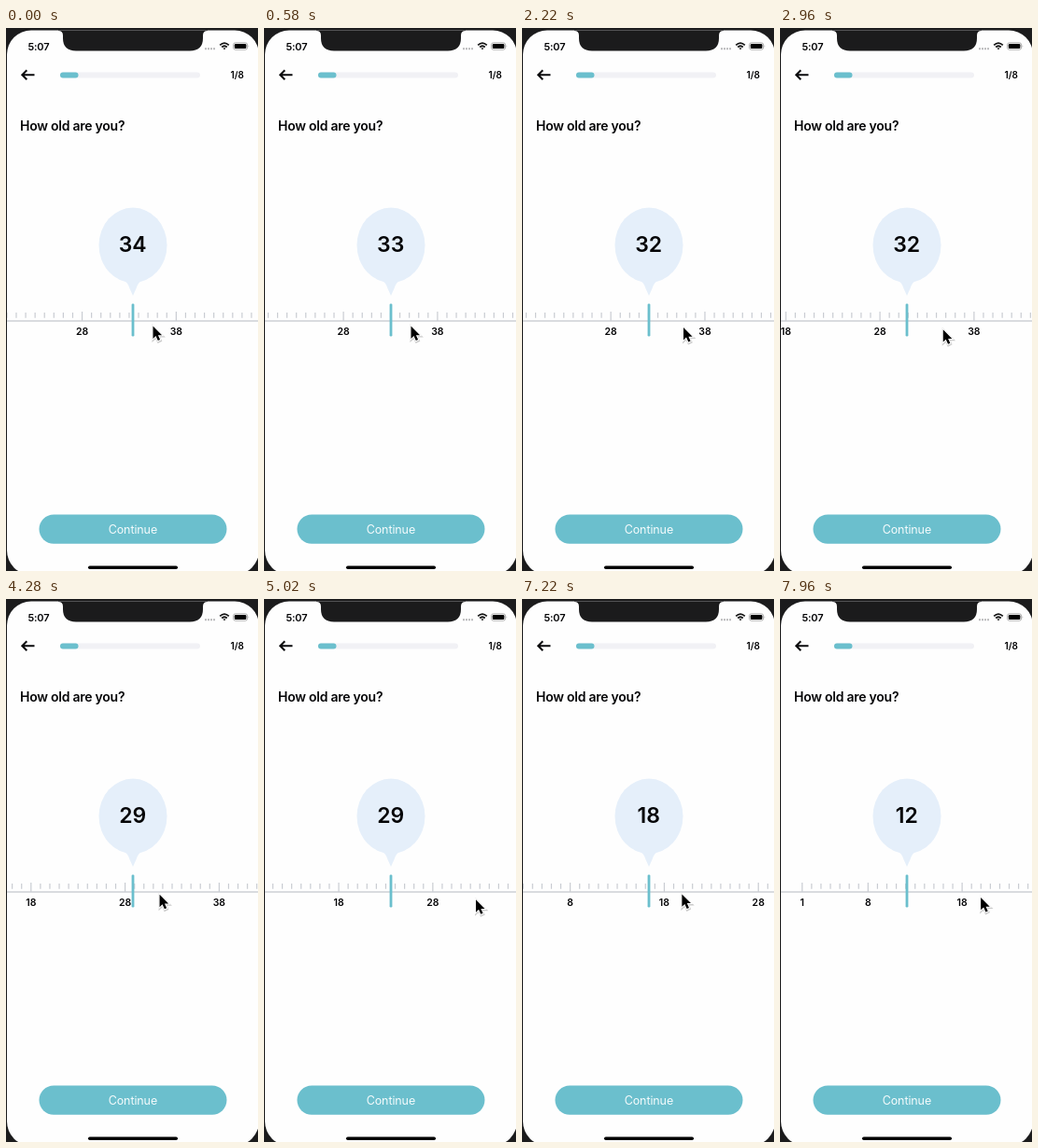
Animation of 270x582 px, one loop 8 s. Source, as an HTML page:

```html
<!DOCTYPE html>
<html lang="en">
<head>
<meta charset="utf-8">
<title>Age picker</title>
<style>
  html, body { margin: 0; width: 100%; height: 100%; overflow: hidden; background: #1b1b1c; }
  svg { display: block; width: 100vw; height: 100vh; }
  text { font-family: Inter, sans-serif; font-weight: 600; fill: #050507; }
  .mid { text-anchor: middle; }
  .teal { fill: #6bbfcd; }
</style>
</head>
<body>
<svg viewBox="0 0 270 582">
  <defs><clipPath id="screen"><rect x="1" y="2.5" width="270" height="583.5" rx="26"/></clipPath></defs>
  <g clip-path="url(#screen)">
    <rect width="272" height="590" fill="#fefefe"/>
    <path d="M56 0V3Q61 3 61 8V11Q61 24.4 75 24.4H197Q211 24.4 211 11V8Q211 3 216 3V0Z" fill="#1b1b1c"/>

    <!-- status bar -->
    <text x="23.5" y="23.5" font-size="11" letter-spacing="-.2">5:07</text>
    <path d="M213 22.3h11" stroke="#b9b9bb" stroke-width="2" stroke-dasharray="2 1"/>
    <g fill="none" stroke="#111" stroke-width="1.7">
      <path d="M229.2 18.4Q234 13.8 238.8 18.4M231.2 20.5Q234 18 236.8 20.5"/>
      <path d="M234 23.3l-1.5-1.6q1.5-1.1 3 0z" fill="#111" stroke="none"/>
    </g>
    <rect x="243.6" y="15.8" width="15" height="7.4" rx="2.2" fill="none" stroke="#999" stroke-width=".8"/>
    <rect x="244.8" y="17" width="12.6" height="5" rx="1.2"/>
    <path d="M259.6 18.2q1.4 1.3 0 2.6z" fill="#999"/>

    <!-- header -->
    <path d="M30.5 50.3H17.5M22.3 45.3L17.3 50.3L22.3 55.3" fill="none" stroke="#0a0a0c" stroke-width="2"/>
    <rect x="58" y="47.6" width="150" height="5.8" rx="2.9" fill="#f1f1f5"/>
    <rect x="58" y="47.6" width="19.5" height="5.8" rx="2.9" class="teal"/>
    <text x="240.5" y="54" font-size="10">1/8</text>
    <text x="15" y="110" font-size="14" letter-spacing="-.25">How old are you?</text>

    <!-- bubble -->
    <g fill="#e5effa">
      <ellipse cx="136" cy="232.8" rx="36.5" ry="40.2"/>
      <path d="M126 270Q130.5 273 132 278L136 287L140 278Q141.5 273 146 270Z"/>
    </g>
    <text id="age" class="mid" x="135.7" y="239.8" font-size="23"></text>

    <!-- ruler -->
    <path d="M0 314H271" stroke="#cccfd4" stroke-width="1.5"/>
    <g id="ruler"></g>
    <rect x="134.6" y="295.5" width="2.8" height="35" rx="1.2" class="teal"/>

    <rect x="35.5" y="521.4" width="201" height="31.4" rx="15.7" class="teal"/>
    <text class="mid" x="135.9" y="541.8" font-size="12.5" letter-spacing="-.1" style="font-weight:400;fill:#f5fbfc">Continue</text>
    <rect x="88" y="576.5" width="96" height="3.5" rx="1.75"/>

    <g id="cursor">
      <path id="arrow" d="M0 0V13.4L3 10.6L5.3 15.6L7.6 14.5L5.4 9.7H9.6Z" transform="translate(.4 1)" stroke="#000" stroke-width="2.8" opacity=".2"/>
      <use href="#arrow" transform="translate(-.4 -1)" opacity="0"/>
      <path d="M0 0V13.4L3 10.6L5.3 15.6L7.6 14.5L5.4 9.7H9.6Z" stroke="#fff" stroke-width="2" paint-order="stroke"/>
    </g>
  </g>
</svg>
<script>
const LOOP = 8000, STEP = 147.5, CENTER = 135.5, UNIT = 10.08;
const $ = id => document.getElementById(id);
const mix = (a, b, k) => a + (b - a) * k;
const clamp = k => Math.min(1, Math.max(0, k));
const ease = k => k * k * (3 - 2 * k);

// Each drag eases the ruler to an age while the pointer goes from one point to another;
// `back` is how many steps the pointer takes to reach the next drag's first point.
const drags = [
  { start: -6, end: 4,    age: 33, from: [157.5, 319.5], to: [157.5, 319.5], back: 1 },
  { start: 8,  end: 11.5, age: 32, from: [149.5, 319.5], to: [173, 321],     back: 1 },
  { start: 17, end: 24,   age: 29, from: [171, 322],     to: [180.5, 325],   back: 1 },
  { start: 28, end: 40,   age: 18, from: [162, 316.5],   to: [292, 328],     back: 2 },
  { start: 46, end: 54.6, age: 12, from: [154, 315],     to: [216, 320],     back: 4 }
];
const FIRST_AGE = 34;

// Ticks sit at their age; the group slides so the current age meets the marker.
let ticks = "";
for (let age = 1; age <= 60; age++) {
  const x = age * UNIT, major = age === 1 || age % 10 === 8;
  ticks += `<path d="M${x} ${major ? 304 : 305}V${major ? 314 : 310.8}" stroke="#c9ccd2" stroke-width="1.2"/>`;
  if (major) ticks += `<text class="mid" x="${x}" y="329" font-size="10.5">${age}</text>`;
}
$("ruler").innerHTML = ticks;

function pointerAt(step, drag, next, k) {
  const back = next ? ease(clamp((step - next.start + 1 + next.back) / next.back)) : 0;
  return drag.to.map((to, i) => {
    const dragged = mix(drag.from[i], to, k);
    return next ? mix(dragged, next.from[i], back) : dragged;
  });
}

function draw(now) {
  const step = Math.floor((now % LOOP + 10.5) / STEP);
  const index = drags.findLastIndex(d => d.start <= step);
  const drag = drags[index], oldAge = index ? drags[index - 1].age : FIRST_AGE;
  const progress = clamp((step - drag.start) / (drag.end - drag.start)), k = ease(progress);
  const [x, y] = pointerAt(step, drag, drags[index + 1], k);

  $("ruler").setAttribute("transform", `translate(${CENTER - mix(oldAge, drag.age, k) * UNIT} 0)`);
  $("cursor").setAttribute("transform", `translate(${x} ${y})`);
  // The bubble only updates once the ruler has almost come to rest.
  $("age").textContent = progress > 0.91 ? drag.age : oldAge;
}

const start = performance.now();
function tick() {
  draw(performance.now() - start);
  requestAnimationFrame(tick);
}
tick();
</script>
</body>
</html>
```
